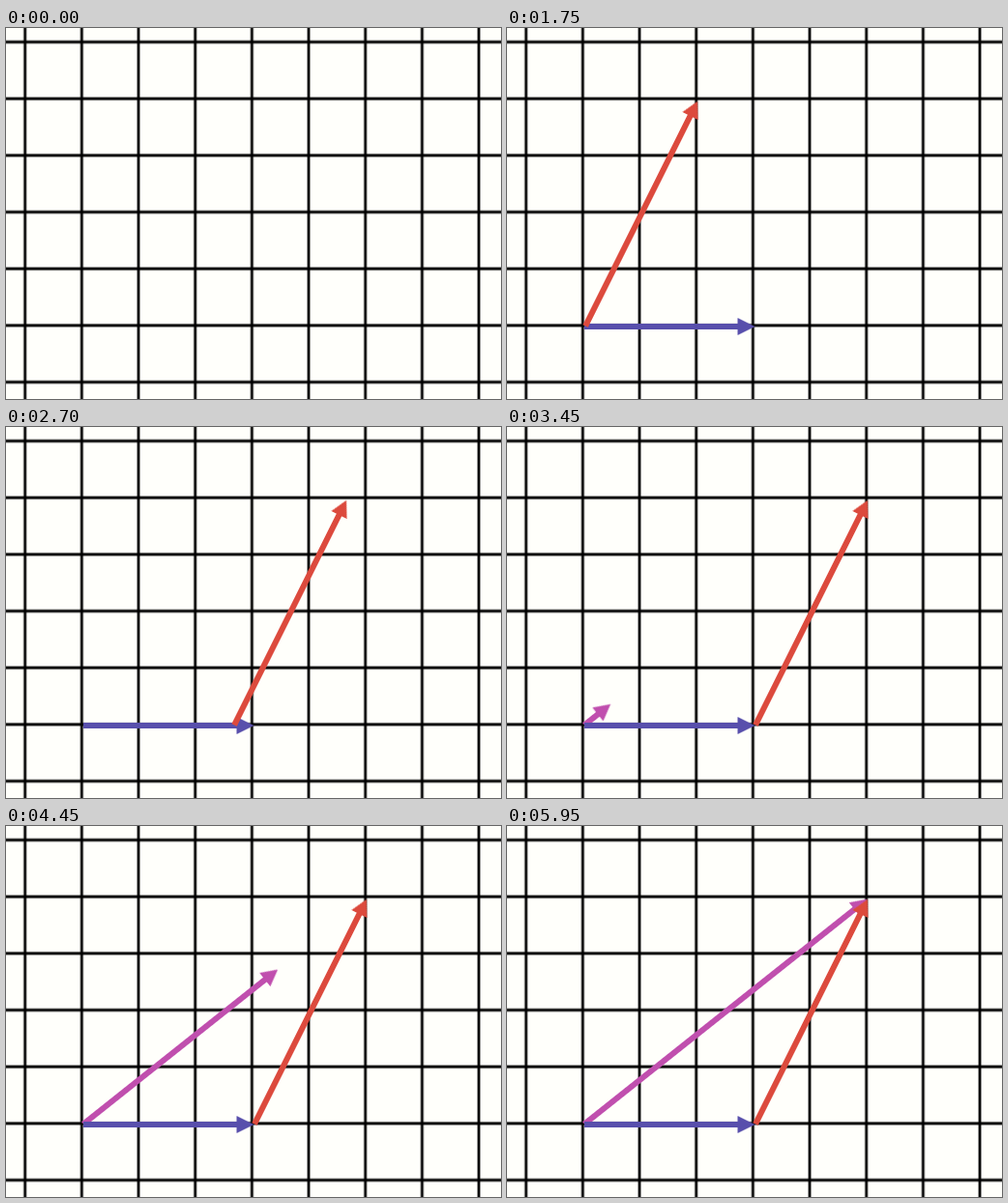
Recreate the animation shown at these times as an HTML page. Size 512 by 384 pixels, loop 6000 ms.

```html
<!DOCTYPE html>
<html lang="en">
<head>
<meta charset="utf-8">
<title>Vector addition</title>
<style>
  html, body { margin: 0; width: 100%; height: 100%; overflow: hidden; background: #fffffb; }
  svg { display: block; width: 512px; height: 384px; }
  .blue, .red, .slide, .sum { animation: 6s linear infinite; }
  .blue { animation-name: show-blue; }
  .red { animation-name: show-red; }
  .slide { animation-name: slide; }
  .sum { animation-name: grow; }

  @keyframes show-blue {
    0% { opacity: 0; }
    11.667%, 100% { opacity: 1; }
  }
  @keyframes show-red {
    0%, 11.667% { opacity: 0; }
    28.333%, 100% { opacity: 1; }
  }
  @keyframes slide {
    0%, 28.4% { transform: translateX(0); animation-timing-function: cubic-bezier(.364, 0, .636, 1); }
    49.8%, 100% { transform: translateX(176.5px); }
  }
  /* The arrow slides out from behind a clip edge at its tail. */
  @keyframes grow {
    0%, 49.8% { transform: translateX(-374px); animation-timing-function: cubic-bezier(.364, 0, .636, 1); }
    89%, 100% { transform: translateX(0); }
  }
</style>
</head>
<body>
<svg viewBox="0 0 512 384">
  <defs>
    <pattern id="grid" x="19.7" y="14.5" width="58.67" height="58.67" patternUnits="userSpaceOnUse" overflow="visible">
      <path d="M0 0H58.67M0 58.67H58.67M0 0V58.67M58.67 0V58.67" stroke="#000" stroke-width="2.8"/>
    </pattern>
    <clipPath id="ahead"><rect x="0" y="-20" width="400" height="40"/></clipPath>
  </defs>
  <rect width="512" height="384" fill="url(#grid)"/>

  <g transform="translate(80 308.5) rotate(-38.5)" clip-path="url(#ahead)">
    <path class="sum" fill="#c04fae" d="M0 -3H357V-9L374 0L357 9V3H0Z"/>
  </g>
  <g transform="translate(79.5 309)">
    <path class="blue" fill="#584fac" d="M0 -3H159V-9L177 0L159 9V3H0Z"/>
  </g>
  <g class="slide">
    <g transform="translate(80.5 308.5) rotate(-63.5)">
      <path class="red" fill="#dc4a3d" d="M0 -3H243V-9L260 0L243 9V3H0Z"/>
    </g>
  </g>
</svg>
</body>
</html>
```
